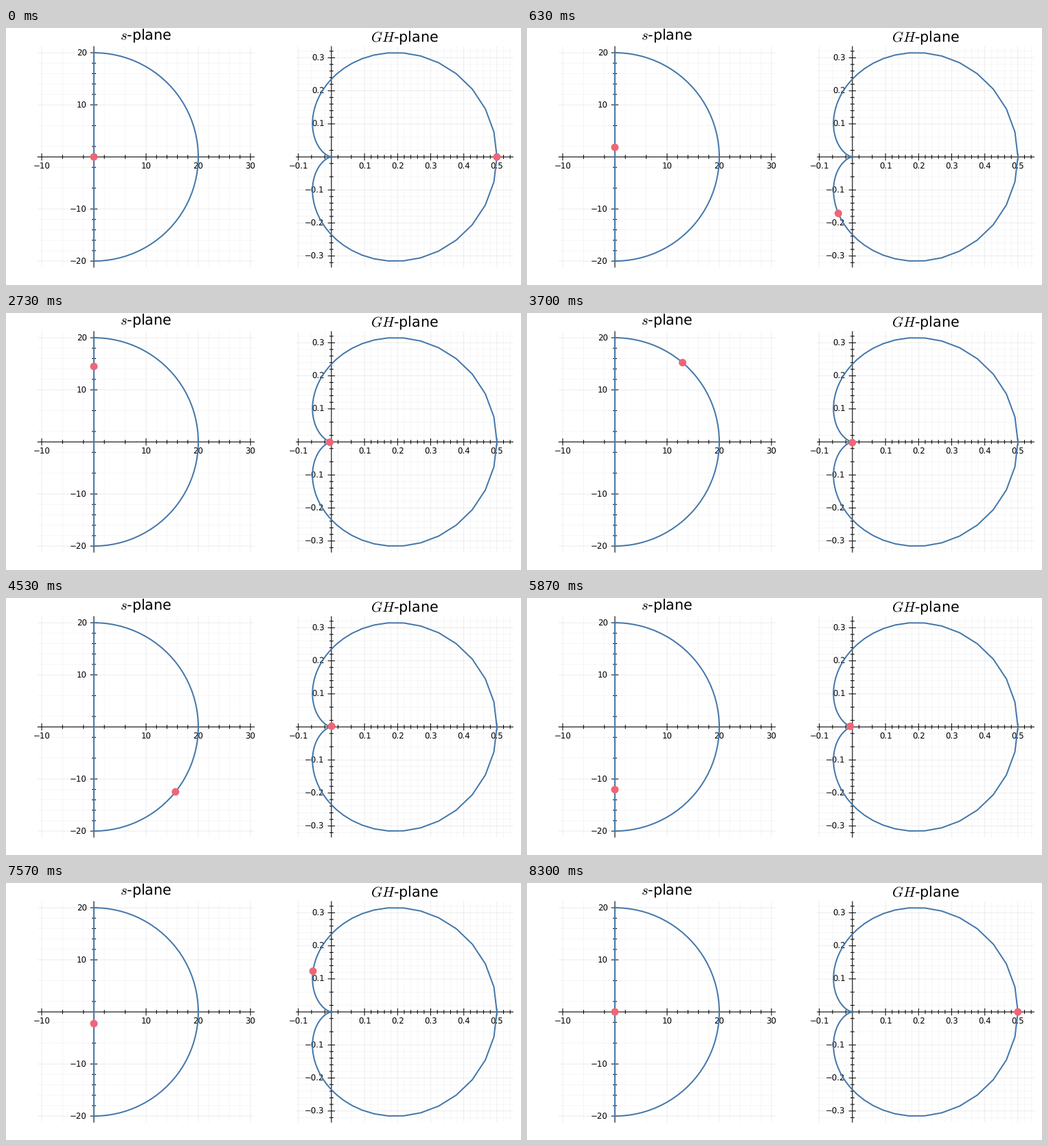
Write a matplotlib script that moves like this. It is 750 by 375 pixels and loops after 8.33 s.

```python
import numpy as np
import matplotlib.pyplot as plt
from matplotlib.animation import FuncAnimation
from matplotlib.patches import Circle

W, H, DPI = 750, 375, 100
PX = 72 / DPI  # points per pixel
BLUE, RED = "#4477AA", "#EE6677"
N = 50  # samples per contour segment
LOOP_MS = 8330

plt.rcParams.update({
    "font.family": "DejaVu Sans",
    "mathtext.fontset": "cm",
    "text.hinting": "none",
    "path.snap": False,
})


def contour():
    """Closed Nyquist contour: up the axis, around the arc, back up to zero."""
    slow, fast = np.linspace(0, 5, N), np.linspace(5, 20, N)
    arc = 20 * np.exp(1j * np.linspace(np.pi / 2, -np.pi / 2, N))
    return np.concatenate([1j * slow, 1j * fast, arc,
                           -1j * fast[::-1], -1j * slow[::-1]])


def minor_ticks(ticks, lo, hi):
    """Four minor ticks in every gap, running on past the last tick."""
    ext = [2 * ticks[0] - ticks[1], *ticks, 2 * ticks[-1] - ticks[-2]]
    vals = [a + (b - a) * k / 5 for a, b in zip(ext, ext[1:]) for k in range(1, 5)]
    return [v for v in vals if lo <= v <= hi]


fig = plt.figure(figsize=(W / DPI, H / DPI), dpi=DPI, facecolor="white")
ax = fig.add_axes([0, 0, 1, 1])
ax.set_xlim(0, W)
ax.set_ylim(H, 0)
ax.axis("off")


def line(xs, ys, width, color="black", **kw):
    ax.plot(xs, ys, color=color, lw=width * PX, **kw)


class Plane:
    TOP, BOTTOM = 27, 349

    def __init__(self, x0, y0, scale, left, right, xticks, yticks, fmt):
        self.x0, self.y0, self.scale = x0, y0, scale
        self.left, self.right = left, right
        self.draw_axis(xticks, fmt, True)
        self.draw_axis(yticks, fmt, False)
        line([left, right], [y0, y0], 1.1, zorder=2)
        line([x0, x0], [self.TOP, self.BOTTOM], 1.1, zorder=2)

    def to_px(self, z):
        return self.x0 + self.scale * z.real, self.y0 - self.scale * z.imag

    def draw_axis(self, ticks, fmt, horizontal):
        if horizontal:
            lo, hi = (self.left - self.x0) / self.scale, (self.right - self.x0) / self.scale
        else:
            lo, hi = (self.y0 - self.BOTTOM) / self.scale, (self.y0 - self.TOP) / self.scale
        groups = ((ticks, 0.1, 4.7), (minor_ticks(ticks, lo, hi), 0.05, 2.5))
        for values, alpha, size in groups:
            for v in values:
                if horizontal:
                    x = self.x0 + v * self.scale
                    line([x, x], [self.TOP, self.BOTTOM], 0.7, alpha=alpha, zorder=1)
                    line([x, x], [self.y0 - size, self.y0 + size], 1, zorder=2)
                else:
                    y = self.y0 - v * self.scale
                    line([self.left, self.right], [y, y], 0.7, alpha=alpha, zorder=1)
                    line([self.x0 - size, self.x0 + size], [y, y], 1, zorder=2)
        for v in ticks:
            label = fmt.format(v).replace("-", "\u2212")
            if horizontal:
                x, y, ha = self.x0 + v * self.scale, self.y0 + 17.3, "center"
            else:
                x, y, ha = self.x0 - 10.2, self.y0 - v * self.scale + 4.4, "right"
            ax.text(x, y, label, ha=ha, va="baseline", fontsize=11.8 * PX, zorder=3)

    def title(self, text, y):
        ax.text((self.left + self.right) / 2, y, text, ha="center",
                va="baseline", fontsize=20.6 * PX)

    def plot(self, z):
        self.xs, self.ys = self.to_px(z)
        line(self.xs, self.ys, 2, BLUE, zorder=4, solid_joinstyle="round")
        self.dot = ax.add_patch(Circle((self.xs[0], self.ys[0]), 5.5,
                                       fc=RED, ec="none", zorder=5))

    def move(self, i):
        self.dot.center = self.xs[i], self.ys[i]
        return self.dot


s = contour()
gh = 1 / ((s + 1) * (s + 2))

s_plane = Plane(128, 188.1, 7.6, 46.3, 361.7,
                [-10, 10, 20, 30], [-20, -10, 10, 20], "{:d}")
s_plane.title("$s$-plane", 17.8)
s_plane.plot(s)

gh_plane = Plane(473.9, 188.1, 482, 422.8, 738.4,
                 [-0.1, 0.1, 0.2, 0.3, 0.4, 0.5],
                 [-0.3, -0.2, -0.1, 0.1, 0.2, 0.3], "{:.1f}")
gh_plane.title("$GH$-plane", 20.7)
gh_plane.plot(gh)


def update(i):
    return s_plane.move(i), gh_plane.move(i)


anim = FuncAnimation(fig, update, frames=len(s), interval=LOOP_MS / len(s),
                     repeat=True, repeat_delay=0, blit=False)
plt.show()
```
